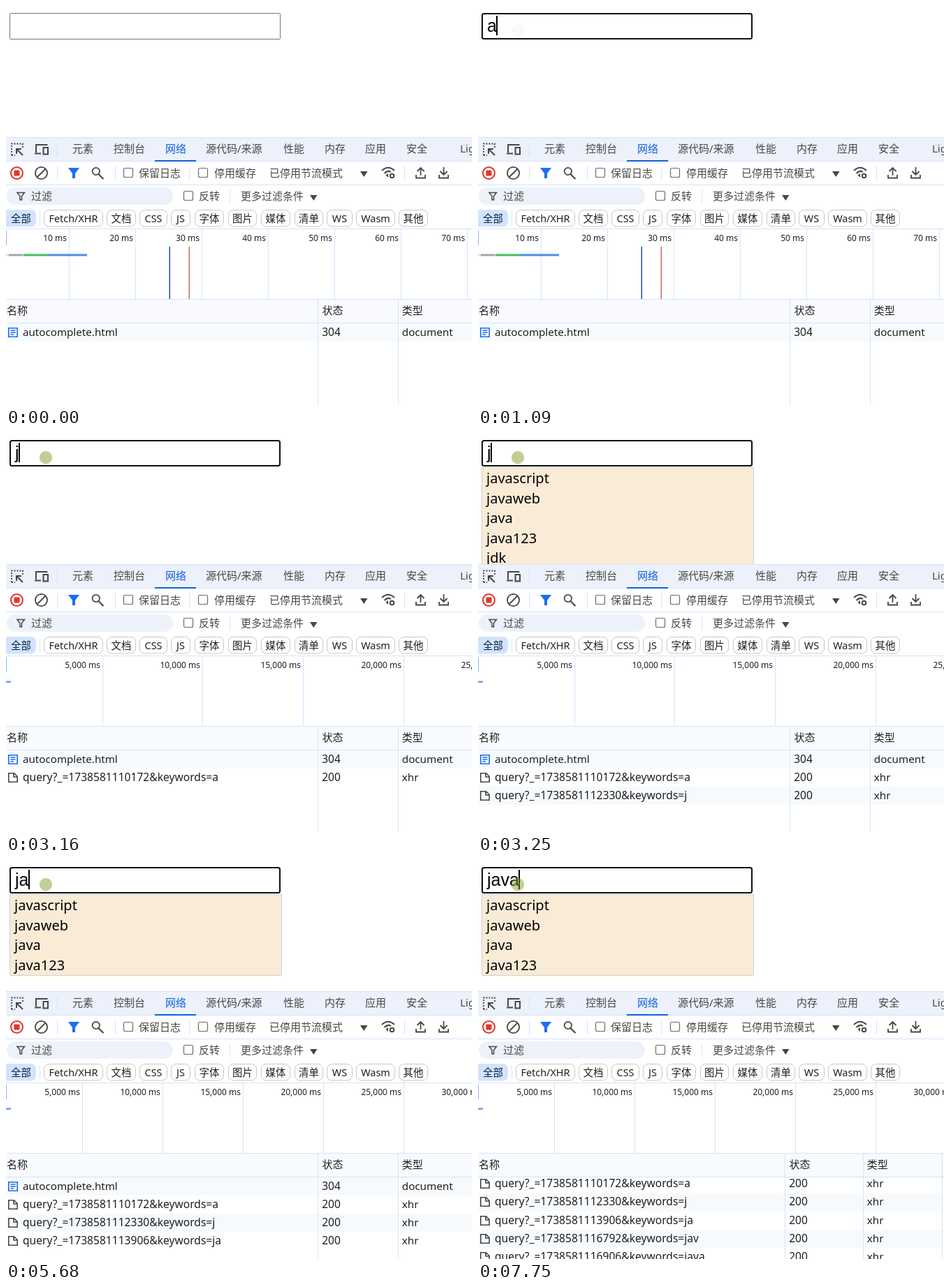
These frames come from a looping animation (667x572 px, 8000 ms). An HTML page:

```html
<!DOCTYPE html>
<html lang="zh-CN">
<head>
<meta charset="utf-8">
<title>autocomplete</title>
<style>
html, body { margin: 0; width: 100%; height: 100%; overflow: hidden; background: #fff; }
svg { display: block; font: 15px "Noto Sans", "Noto Sans CJK SC", "Noto Sans CJK", sans-serif; fill: #1f1f1f; }
.typed { font: 25px "Liberation Sans", Arial, sans-serif; font-kerning: none; fill: #000; }
</style>
</head>
<body>
<svg id="stage" width="667" height="572" viewBox="0 0 667 572"></svg>
<script>
const LOOP = 8000;
const GREY = '#474747', RULE = '#d3e3fd', BLUE = '#1260dc';

const rect = (x, y, w, h, fill, more = '') =>
  `<rect x="${x}" y="${y}" width="${w}" height="${h}" fill="${fill}" ${more}/>`;
const text = (x, y, s, more = '') => `<text x="${x}" y="${y}" ${more}>${s.replace(/&/g, '&amp;')}</text>`;
const line = (d, color = GREY, w = 1.8, more = '') =>
  `<path d="${d}" fill="none" stroke="${color}" stroke-width="${w}" ${more}/>`;
const fillPath = (d, color = GREY) => `<path d="${d}" fill="${color}"/>`;
const ring = (x, y, r, color = GREY, w = 1.8) =>
  `<circle cx="${x}" cy="${y}" r="${r}" fill="none" stroke="${color}" stroke-width="${w}"/>`;
const sep = (x, y) => rect(x, y, 1, 20, RULE);
const box = (x, y) => rect(x + .5, y + .5, 13, 13, '#fff', 'rx="2" stroke="#6a6a6a" stroke-width="1.2"');
const arrow = (x, y) => fillPath(`M${x} ${y}h10.5l-5.2 8z`);
const grey = `fill="${GREY}"`;

function tabBar() {
  const tabs = [[95, '元素'], [154, '控制台'], [228, '网络'], [286, '源代码/来源'], [397, '性能'],
    [456, '内存'], [514, '应用'], [573, '安全'], [650, 'Lighthouse']];
  return rect(0, 188, 667, 35, '#ecf1fb') + rect(0, 188, 667, 1, RULE) + rect(0, 222, 667, 1, RULE) +
    line('M8 214V197.5H24V203M8 214H13', GREY, 1.8, 'stroke-dasharray="2 2"') +
    line('M15 212V205H22M15.5 205.5L24 214', GREY, 2) +
    line('M43 210V199H59.5M41 211.5H50', GREY, 2) + line('M53.5 203H60V212.5H53.5Z', GREY, 2) +
    sep(73, 196) +
    tabs.map(([x, s]) => text(x, 210, s, `fill="${s === '网络' ? BLUE : GREY}"`)).join('') +
    rect(213, 221, 59, 2, BLUE);
}

function toolBar() {
  return rect(0, 256, 667, 1, RULE) +
    ring(15.5, 239.5, 8.5, '#e0352b', 2) + rect(11.5, 235.5, 8, 8, '#e0352b', 'rx="1"') +
    ring(50.5, 239.5, 8.6) + line('M44.5 245.5L56.5 233.5') + sep(73, 230) +
    fillPath('M89 232H105L99 240V247H95V240Z', '#1a6ef0') +
    ring(128.8, 237, 5.2) + line('M132.5 241L139.5 248', GREY, 2.2) + sep(156, 230) +
    box(168, 232) + text(190, 245, '保留日志', grey) + sep(262, 230) +
    box(275, 232) + text(298, 245, '停用缓存', grey) +
    text(377, 245, '已停用节流模式', grey) + arrow(507, 237) +
    line('M538 236Q547 227.5 556 236M541.5 240Q546.5 235 551 238', GREY, 2) +
    fillPath('M543.5 242.5L547 246V240Z') + ring(552.5, 243.5, 2.8, GREY, 2) + sep(570, 230) +
    line('M593.5 243V232.5M588.5 237L593.5 232L598.5 237M587 242V246.5H600V242') +
    line('M626.5 231V241.5M621.5 237L626.5 242L631.5 237M620 242V246.5H633V242');
}

function filters() {
  const chips = [[54, 85, 'Fetch/XHR'], [144, 42, '文档'], [191, 40, 'CSS'], [236, 28, 'JS'], [270, 42, '字体'],
    [318, 41, '图片'], [365, 42, '媒体'], [413, 41, '清单'], [459, 37, 'WS'], [501, 56, 'Wasm'], [562, 42, '其他']];
  const chip = ([x, w, s]) =>
    rect(x + .5, 292.5, w - 1, 23.5, '#fff', 'rx="7" stroke="#c7c7c7"') +
    text(x + w / 2, 310, s, 'text-anchor="middle" font-size="14.4"');
  return rect(1, 260, 238, 25, '#edf2fa', 'rx="12.5"') +
    line('M16 267.5H26.5L22.6 272.5V278H20V272.5Z', GREY, 1.5) + text(36, 278, '过滤', grey) +
    box(254, 265) + text(276, 278, '反转', grey) + sep(320, 263) +
    text(336, 278, '更多过滤条件', grey) + arrow(435, 271) +
    rect(-4, 292, 47, 24.5, RULE, 'rx="7"') + text(7, 310, '全部', 'font-size="14.4" fill="#041e49"') +
    sep(48, 294) + chips.map(chip).join('');
}

const chrome = tabBar() + toolBar() + filters();

function timeline(t) {
  const [first, gap, unit] = t < 1180 ? [90, 95, 10] : t < 4780 ? [138, 143.7, 5000] : [109, 115, 5000];
  let out = rect(0, 319, 667, 1, RULE);
  for (let i = 0; i < 7; i++) {
    const x = Math.floor(first + i * gap);
    out += rect(x, 320, 1, 100, RULE) +
      text(x - 3, 337, `${((i + 1) * unit).toLocaleString('en-US')} ms`, 'text-anchor="end" font-size="12"');
  }
  out += rect(0, 322, 1, 21, '#8ab4f8');
  if (unit > 10) return out + rect(0, 355.5, 7, 2.5, '#6a9ff0');
  return out + rect(0, 355.5, 4, 2.5, '#ddd') + rect(4, 355.5, 19.5, 3, '#a8a8a8') +
    rect(24.5, 355.5, 34.5, 3, '#3fc060') + rect(59, 355.5, 57, 3, '#4a8fe8') +
    rect(233.5, 345, 1.5, 75, '#1a4fa8') + rect(261.5, 345, 1.5, 75, '#d96a5c');
}

const queries = [[1180, '1738581110172', 'a'], [3250, '1738581112330', 'j'], [4780, '1738581113906', 'ja'],
  [7570, '1738581116792', 'jav'], [7750, '1738581116906', 'java']];

function table(t) {
  const narrow = t >= 7570;
  const [c1, c2] = narrow ? [439, 551] : [446, 561];
  const scroll = t >= 7750 ? 29.5 : narrow ? 3.3 : 0;
  const rows = [['autocomplete.html', '304', 'document'],
    ...queries.filter(q => t >= q[0]).map(q => [`query?_=${q[1]}&keywords=${q[2]}`, '200', 'xhr'])];
  let out = '';
  rows.forEach(([name, status, type], i) => {
    const y = 454.5 + 26.2 * i - scroll, mid = Math.round(y + 13);
    if (i % 2 === 0) out += rect(0, y, 667, 26.2, '#f7fafd');
    out += i
      ? line(`M3.8 ${mid - 6.2}H11.5L16.2 ${mid - 1.5}V${mid + 6.2}H3.8ZM11 ${mid - 6}V${mid - 1}H16`, GREY, 1.6)
      : line(`M3.8 ${mid - 6.2}H16.2V${mid + 6.2}H3.8ZM6.5 ${mid - 3}H13.5M6.5 ${mid}H13.5M6.5 ${mid + 3}H11`, '#1a6ee8', 1.6);
    out += text(24, mid + 5, name, `font-size="${i ? 15.6 : 15.15}"`) +
      text(c1 + 6.2, mid + 5, status, 'font-size="15.6"') + text(c2 + 5.8, mid + 5, type, 'font-size="15.2"');
  });
  out += rect(0, 420, 667, 35, '#f8fafd') + rect(0, 420, 667, 1, RULE) + rect(0, 454, 667, 1, RULE) +
    text(1, 442, '名称') + text(c1 + 6.5, 442, '状态') + text(c2 + 5.8, 442, '类型');
  for (const x of narrow ? [c1, c2, 664] : [c1, c2]) out += rect(x, 421, 1, 151, RULE);
  return out;
}

const typing = [[0, ''], [1000, 'a'], [2260, ''], [3160, 'j'], [4600, 'ja'], [7390, 'jav'], [7570, 'java']];
const blinks = [180, 710, 1000, 1540, 2080, 2620, 3070, 3700, 4150, 5140, 5680, 6130, 6670, 7210, 7390];
const advance = { j: .222, a: .556, v: .5 };

function field(t) {
  const value = typing.filter(k => t >= k[0]).pop()[1];
  let out = t < 180
    ? rect(5.5, 10.5, 387, 37, '#fff', 'rx="1" stroke="#767676"')
    : rect(6, 11, 386, 36, '#fff', 'rx="2.5" stroke="#101010" stroke-width="2"');
  out += text(13, 37, value, 'class="typed"');
  if (blinks.filter(b => t >= b).length % 2) {
    const width = [...value].reduce((sum, c) => sum + advance[c] * 25, 0);
    out += rect(Math.floor(13 + width), 14, 2, 28, '#000');
  }
  return out;
}

function suggestions(t) {
  if (t < 3250) return '';
  const words = ['javascript', 'javaweb', 'java', 'java123'];
  if (t < 4780) words.push('jdk');
  return rect(5.5, 49.5, 389, t < 4780 ? 150 : 116, '#faebd7', 'stroke="#d0d0d0"') +
    words.map((w, i) => text(12, 72 + 28.5 * i, w, 'font-size="20" fill="#000"')).join('');
}

function pointer(t) {
  let alpha = t < 90 ? 0 : 1;
  if (t >= 470 && t < 3160) alpha = Math.max(0, 1 - (Math.floor((t - 470) / 88.5) + 1) / 9);
  return `<circle cx="57" cy="${t < 180 ? 16 : 35}" r="9.2" fill="#84a02d" fill-opacity="${alpha / 2}"/>`;
}

const stage = document.getElementById('stage');
let shown = '';
function frame() {
  const t = performance.now() % LOOP;
  const view = rect(0, 0, 667, 572, '#fff') + field(t) + suggestions(t) + pointer(t) +
    rect(0, 188, 667, 384, '#fff') + chrome + timeline(t) + table(t);
  if (view !== shown) stage.innerHTML = shown = view;
  requestAnimationFrame(frame);
}
frame();
</script>
</body>
</html>
```
